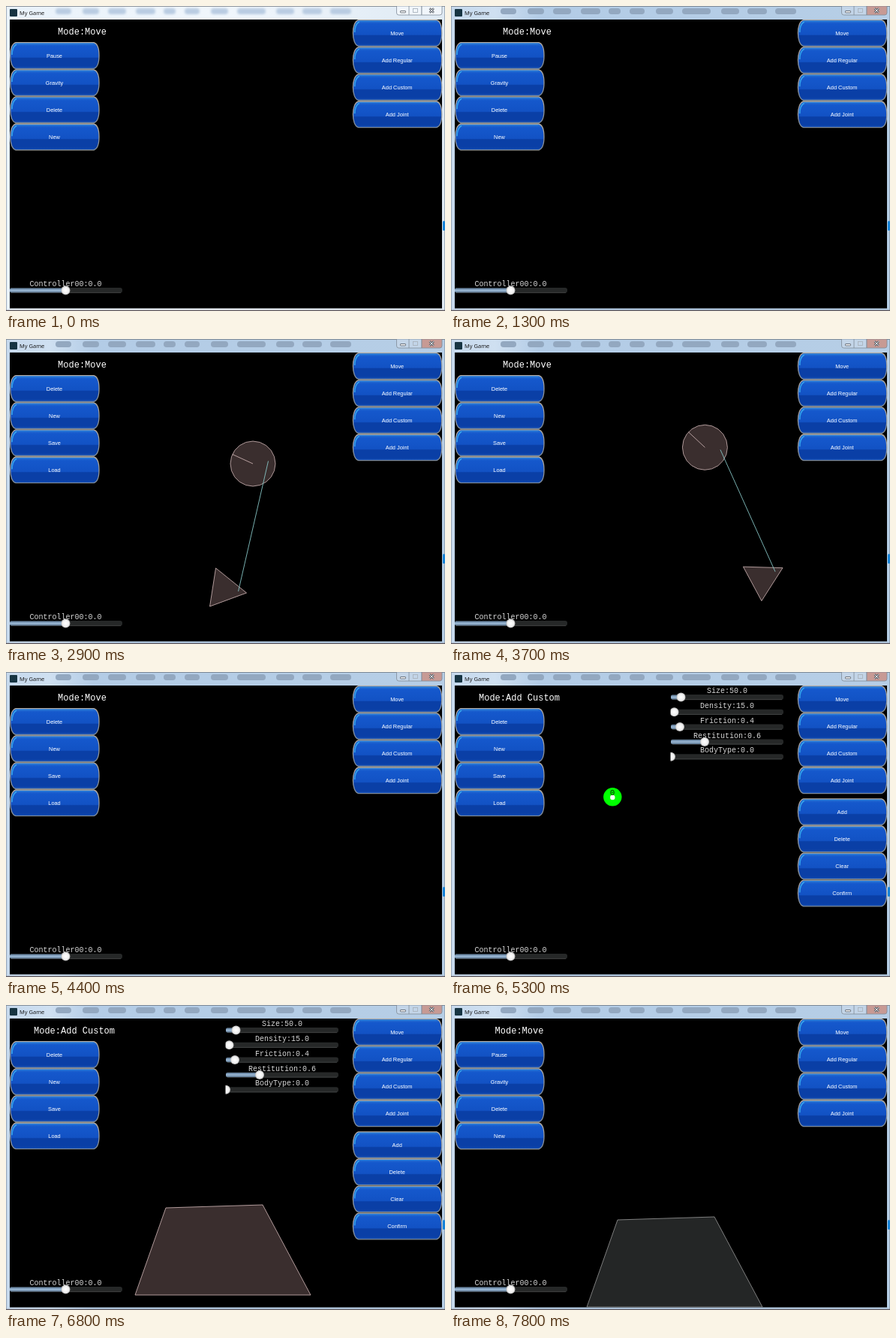
An HTML page for the animation above (8000 ms loop, 585x406 px).

```html
<!DOCTYPE html>
<html lang="en">
<head>
<meta charset="utf-8">
<title>My Game</title>
<style>
html, body { margin: 0; width: 100%; height: 100%; overflow: hidden; background: #000; }
svg { display: block; width: 585px; height: 406px; }
text { text-anchor: middle; }
.btn text { font: 7.4px "Liberation Sans", Arial, sans-serif; fill: #fff; }
.mode { font: 12px "Liberation Mono", monospace; fill: #fff; }
.label { font: 10px "Liberation Mono", monospace; fill: #d8d8d8; }
.num { font: 11px "Liberation Mono", monospace; fill: #043004; }
.title { font: 7.5px "Open Sans", sans-serif; fill: #101010; text-anchor: start; }
.body { fill: #3a2e2e; stroke: #d6bcbc; stroke-width: .8; }
.asleep { fill: #242626; stroke: #9a9a9a; }
</style>
</head>
<body>
<svg viewBox="0 0 585 406">
  <defs>
    <linearGradient id="face" x2="0" y2="1">
      <stop offset="0" stop-color="#2a78d8"/>
      <stop offset=".14" stop-color="#1558cc"/>
      <stop offset=".56" stop-color="#1252c4"/>
      <stop offset=".6" stop-color="#0a3fa6"/>
      <stop offset=".9" stop-color="#0a3fa6"/>
      <stop offset="1" stop-color="#1450b8"/>
    </linearGradient>
    <linearGradient id="rim" x2="0" y2="1">
      <stop offset="0" stop-color="#b4aca2"/>
      <stop offset="1" stop-color="#7e8c9c"/>
    </linearGradient>
    <linearGradient id="idle" x2="1" y2="0">
      <stop offset="0" stop-color="#e9f2fa"/>
      <stop offset=".5" stop-color="#f0f6fc"/>
      <stop offset="1" stop-color="#dfeaf4"/>
    </linearGradient>
    <linearGradient id="active" x2="1" y2="0">
      <stop offset="0" stop-color="#c6d9ed"/>
      <stop offset=".1" stop-color="#cfe0f1"/>
      <stop offset=".2" stop-color="#b3cce6"/>
      <stop offset="1" stop-color="#b6cee6"/>
    </linearGradient>
    <linearGradient id="fill" x2="0" y2="1">
      <stop offset="0" stop-color="#54708c"/>
      <stop offset=".5" stop-color="#9dbbd8"/>
      <stop offset="1" stop-color="#5c7690"/>
    </linearGradient>
    <radialGradient id="knob">
      <stop offset="0" stop-color="#fff"/>
      <stop offset=".7" stop-color="#f0f0f0"/>
      <stop offset="1" stop-color="#b4b4b4"/>
    </radialGradient>
    <filter id="soft" x="-20%" y="-100%" width="140%" height="300%"><feGaussianBlur stdDeviation="1.6"/></filter>
    <clipPath id="view"><rect x="5" y="18" width="576" height="384.5"/></clipPath>
    <clipPath id="list"><rect x="4" y="48" width="122" height="144.5"/></clipPath>
    <clipPath id="tracks"><rect x="292.5" y="18" width="152" height="110"/></clipPath>
    <g id="plate">
      <path d="M8 .7H112C117 2 119 10 119 18S117 34 112 35.3H8C3 34 .7 26 .7 18S3 2 8 .7Z" fill="url(#face)" stroke="url(#rim)" stroke-width="1.3"/>
      <path d="M9 3C4 6 3 12 3 17" fill="none" stroke="#35a4ec" stroke-width="1.6"/>
      <path d="M9 2.2H111" stroke="#2b86dc" stroke-width=".8"/>
    </g>
  </defs>

  <rect id="shell" width="585" height="406"/>
  <g id="blobs"></g>
  <path d="M0 .4H585" stroke="#6a7078" stroke-width=".8"/>
  <path d="M.4 0V406M584.6 0V406" stroke="#8794a2" stroke-width=".8"/>
  <path d="M0 405.3H585" stroke="#5c5458" stroke-width="1.2"/>
  <rect x="582" y="286" width="3" height="13" rx="1.5" fill="#1683d8"/>
  <rect x="5" y="4" width="10" height="10" rx="1" fill="#173442"/>
  <text class="title" x="18" y="12">My Game</text>
  <g stroke="#7f8b98" stroke-width=".8">
    <path id="caps" d="M520.5 0V9Q520.5 12 523.5 12H554V0Z"/>
    <path id="close" d="M554 0V12H578Q581 12 581 9V0Z"/>
    <path d="M537 0V12"/>
  </g>
  <g fill="none" stroke="#4c545e">
    <rect x="525.5" y="6.5" width="7" height="2.4" rx=".6" fill="#fff" stroke-width=".8"/>
    <rect x="542.5" y="3.5" width="6" height="5" stroke="#aab4be" stroke-width=".9"/>
    <path d="M564.5 3.2L570 8.8M570 3.2L564.5 8.8" stroke-width="2.6"/>
    <path d="M564.5 3.2L570 8.8M570 3.2L564.5 8.8" stroke="#fff" stroke-width="1"/>
  </g>

  <rect x="5" y="18" width="576" height="384.5"/>
  <g clip-path="url(#view)">
    <g id="pair">
      <polygon id="ball" class="body"/>
      <polygon id="tri" class="body"/>
      <path id="spoke" stroke="#d6bcbc" stroke-width=".8"/>
      <path id="rod" stroke="#86c4c4" stroke-width=".9"/>
    </g>
    <polygon id="quad" class="body"/>
    <g id="dots"></g>
  </g>
  <text id="mode" class="mode" y="38"></text>
  <g clip-path="url(#list)"><g id="left"></g></g>
  <g id="right"></g>
  <g id="panel"><g id="tools"></g><g id="sliders" clip-path="url(#tracks)"></g></g>
  <g id="control"></g>
</svg>
<script>
const $ = id => document.getElementById(id);
const clamp = v => Math.max(0, Math.min(1, v));
const show = (id, on) => $(id).setAttribute('display', on ? 'inline' : 'none');
const set = (id, name, value) => $(id).setAttribute(name, value);
const points = list => list.map(p => p.map(v => v.toFixed(2)).join()).join(' ');

const buttons = (x, y, names) => names.map((name, i) =>
  `<g class="btn" transform="translate(${x} ${y + i * 36.1})"><use href="#plate"/>` +
  `<text x="59.5" y="20.6">${name}</text></g>`).join('');

const slider = (x, y, knob, label, cx) =>
  `<rect x="${x}" y="${y - 3.5}" width="150" height="7" rx="3" fill="#262828"/>` +
  `<path d="M${x + 2} ${y + 3.2}h146" stroke="#4a4c4c" stroke-width=".8"/>` +
  `<rect x="${x}" y="${y - 3}" width="${knob - x}" height="6" rx="2" fill="url(#fill)"/>` +
  `<circle cx="${knob}" cy="${y}" r="6" fill="url(#knob)"/>` +
  `<text class="label" x="${cx}" y="${y - 5.3}">${label}</text>`;

$('left').innerHTML = buttons(5, 48, ['Pause', 'Gravity', 'Delete', 'New', 'Save', 'Load']);
$('right').innerHTML = buttons(461.7, 18, ['Move', 'Add Regular', 'Add Custom', 'Add Joint']);
$('tools').innerHTML = buttons(461.7, 168.2, ['Add', 'Delete', 'Clear', 'Confirm']);
$('control').innerHTML = slider(5, 378.5, 79.5, 'Controller00:0.0', 79.5);
$('sliders').innerHTML = [
  ['Size:50.0', 306.5], ['Density:15.0', 297.5], ['Friction:0.4', 305],
  ['Restitution:0.6', 338], ['BodyType:0.0', 293]
].map(([label, knob], i) => slider(293, 33.5 + i * 19.8, knob, label, 368)).join('');

// smudges seen through the glass title bar: [x, width]
$('blobs').innerHTML = [[66, 21], [102, 22], [136, 24], [173, 26], [210, 16], [238, 20],
  [273, 23], [308, 38], [360, 24], [395, 26], [432, 28]].map(([x, w]) =>
  `<rect x="${x}" y="3" width="${w}" height="8" rx="4"/>`).join('');

const start = [[215, 166], [170, 280], [405, 290], [345, 167]];
const rest = [[222, 286], [181, 402], [415, 402], [351, 282]];

$('dots').innerHTML = start.map(([x, y], i) =>
  `<g><circle cx="${x + .3}" cy="${y + .3}" r="12.2" fill="#0f0"/>` +
  `<circle cx="${x + .3}" cy="${y + 1}" r="3.2" fill="#fff"/>` +
  `<text class="num" x="${x}" y="${y - 2}">${i}</text></g>`).join('');

const turn = ([x, y], a, [ox, oy]) => [
  ox + x * Math.cos(a) - y * Math.sin(a),
  oy + x * Math.sin(a) + y * Math.cos(a)];

// disc and triangle swinging on a rigid rod
function swing(s) {
  const c = [329 + 10 * Math.sin(2.4 * s), 166 - 25 * Math.sin(1.5 * s) ** 2];
  const spin = .4 * s;
  const deg = 8 - 29 * Math.cos(4.2 * s + .76);
  const phi = (deg + .05) * Math.PI / 180;
  const top = turn([20.5, -3.5], spin, c);
  const end = [top[0] + 178 * Math.sin(phi), top[1] + 178 * Math.cos(phi)];
  const tilt = -(phi + .2265);
  set('ball', 'points', points(Array.from({ length: 20 }, (_, i) => turn([30, 0], spin + i * Math.PI / 10, c))));
  set('tri', 'points', points([[-30, -31], [11, 2], [-38, 20]].map(p => turn(p, tilt, end))));
  set('spoke', 'd', 'M' + c + 'L' + turn([-27.3, -12.5], spin, c));
  set('rod', 'd', 'M' + top + 'L' + end);
}

// free fall, a tilted landing, two bounces
function drop(s) {
  const hop = (from, to, h) => {
    const u = (s - from) / (to - from);
    return u > 0 && u < 1 ? 4 * h * u * (1 - u) : 0;
  };
  const lift = s < .39 ? 112 * (1 - (s / .39) ** 2) : hop(.39, .69, 17.2) + hop(.69, .81, 3);
  const flat = clamp((s - .39) / .11);
  const slide = 9 * clamp((s - .5) / .3) - 9;
  set('quad', 'points', points(start.map(([x, y], i) => [
    x + (rest[i][0] + slide - x) * flat,
    y + 112 + (rest[i][1] - y - 112) * flat - lift])));
}

function draw(t) {
  const active = t >= 1300;
  set('shell', 'fill', active ? 'url(#active)' : 'url(#idle)');
  set('blobs', 'fill', active ? '#93a8c0' : '#b9cce2');
  set('blobs', 'filter', active ? 'none' : 'url(#soft)');
  set('caps', 'fill', active ? '#c3d5e8' : '#f1f6fb');
  set('close', 'fill', active ? '#c79a94' : '#f1f6fb');

  const left = t < 7200 ? 1 - (1 - clamp((t - 1300) / 700)) ** 2.53
                        : (1 - clamp((t - 7200) / 500)) ** 2.53;
  set('left', 'transform', `translate(0 ${-72.2 * left})`);

  const custom = t >= 5000 && t < 7200;
  $('mode').textContent = custom ? 'Mode:Add Custom' : 'Mode:Move';
  set('mode', 'x', t < 5000 ? 101.5 : 91);
  show('panel', custom);

  const pair = t >= 2400 && t < 4400;
  show('pair', pair);
  if (pair) swing((t - 2900) / 1000);

  [...$('dots').children].forEach((dot, i) =>
    dot.setAttribute('display', t >= 5300 + i * 200 && t < 6400 ? 'inline' : 'none'));

  show('quad', t >= 6300);
  if (t >= 6300) drop((t - 6300) / 1000);
  set('quad', 'class', t >= 7600 ? 'body asleep' : 'body');
}

const began = performance.now();
let last = -1;
function tick() {
  const t = Math.floor((performance.now() - began) % 8000 / 100) * 100;
  if (t !== last) draw(last = t);
  requestAnimationFrame(tick);
}
tick();
</script>
</body>
</html>
```
